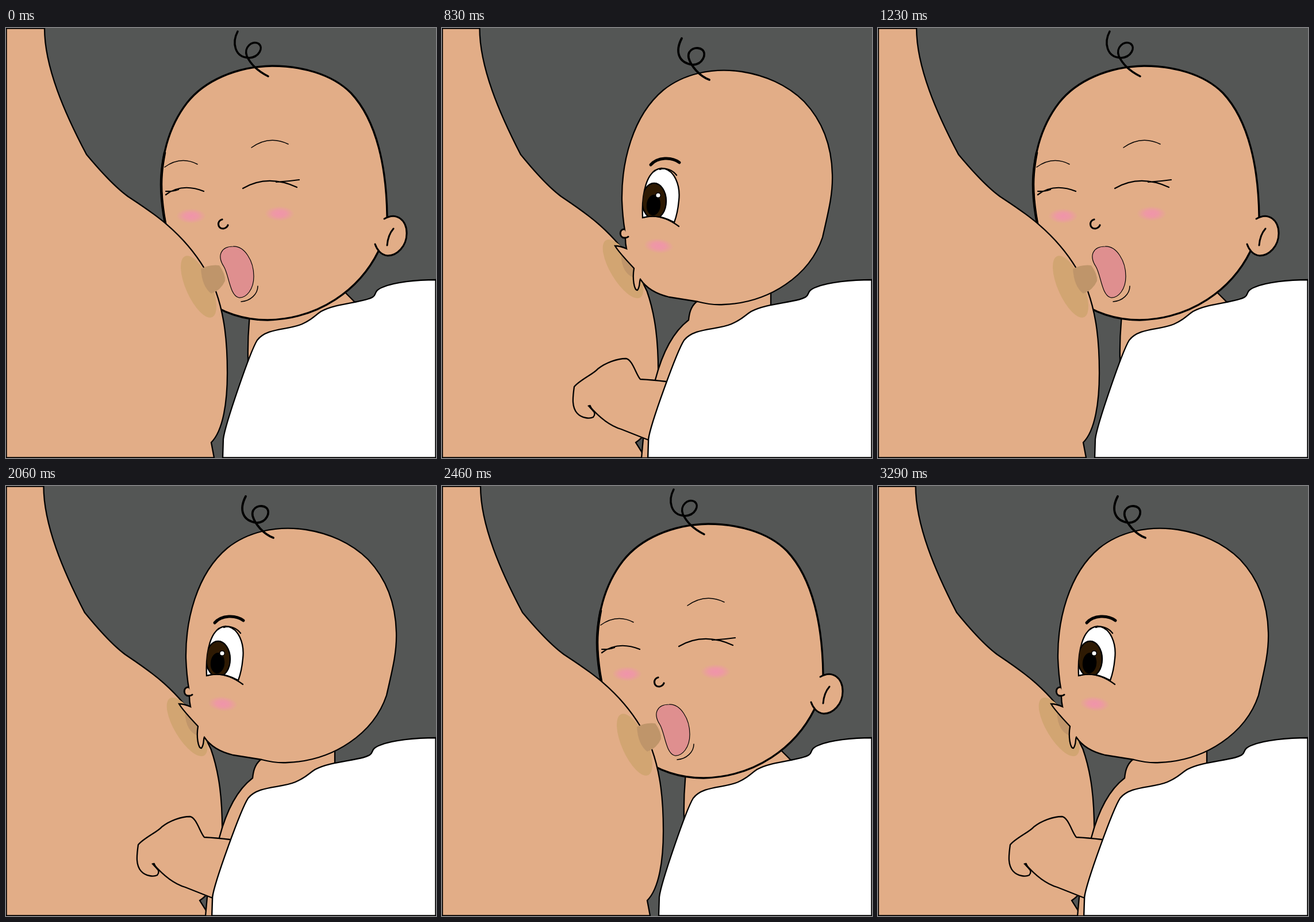
Recreate the animation shown at these times as an HTML page. Size 748 by 748 pixels, loop 3.69 s.

```html
<!DOCTYPE html>
<html lang="en">
<head>
<meta charset="utf-8">
<title>Latching on</title>
<style>
  html, body { margin: 0; width: 100%; height: 100%; overflow: hidden; background: #545655; }
  svg { display: block; width: 100%; height: 100%; }
  .skin { fill: #e2ad87; }
  .line { fill: none; }
  .thin { fill: none; stroke-width: 1.5; }
  .lid { fill: none; stroke-width: 2.2; }
  .flat { stroke: none; }
  .areola { stroke: none; fill: #d2a572; }
  .nipple { stroke: none; fill: #bf956a; }
  .mouth { fill: #df8f8f; stroke-width: 1.2; }
  .breast { vector-effect: non-scaling-stroke; }
  .blush { stroke: none; fill: url(#blush); }
  .pose { display: none; }
</style>
</head>
<body>
<svg viewBox="0 0 748 748" stroke="#000" stroke-width="2.3" stroke-linecap="round">
  <defs>
    <radialGradient id="blush">
      <stop offset="0" stop-color="#f094aa"/>
      <stop offset=".45" stop-color="#f094aa" stop-opacity=".8"/>
      <stop offset="1" stop-color="#f094aa" stop-opacity="0"/>
    </radialGradient>
    <path id="shirt" fill="#fff" d="M748 438C715 438 675 442 655 451C638 458 646 463 638 468C622 478 575 478 548 493C537 500 535 506 515 515C490 526 454 521 437 543C425 562 381 690 378 715L377 747.5H747.5V438"/>
    <path id="neck" class="skin" d="M424 500Q420 540 421 580L500 600L612 482L588 458"/>
    <path id="hair" class="line" stroke-width="3.5" d="M403 6C393 25 397 51 423 52C440 51 449 34 439 27C428 21 413 34 419 49C426 64 440 76 456 84"/>
    <g id="head">
      <path class="skin" stroke-width="3.3" d="M663 329C662 245 646 162 600 113C566 79 512 66 463 66C400 67 345 92 315 130C280 175 270 230 270 272C270 300 275 345 291 395C300 425 320 450 345 471C375 496 415 508 455 508C545 506 615 455 648 388"/>
      <path class="line" stroke-width="4.5" d="M276 217C272 237 270 255 270 272C270 300 275 345 291 395"/>
      <g stroke-width="3">
        <path class="skin" d="M658 332C680 319 697 335 697 357C697 380 680 396 664 396C652 395 645 385 642 376"/>
        <path class="line" d="M674 349C667 357 664 365 663 378"/>
      </g>
      <use href="#hair"/>
    </g>
    <path id="nipple" class="nipple" d="M339 419Q355 411 371 413Q382 428 381 440Q374 456 357 462Q341 450 339 419Z"/>
    <ellipse id="areola" class="areola" rx="22" ry="58"/>
    <path id="eye" d="M349 330C347 290 355 246 382 244C405 245 415 275 412 300Q410 322 404 338Q375 322 349 330Z"/>
    <clipPath id="eyeClip"><use href="#eye"/></clipPath>
  </defs>

  <g class="pose">
    <use href="#neck"/>
    <use href="#shirt"/>
    <use href="#head"/>
    <path class="thin" d="M276 242Q304 222 333 237M427 208Q458 186 491 202"/>
    <path class="lid" d="M278 290Q306 269 344 284M278 284Q288 285 300 281M412 279Q455 254 506 277M470 268Q490 267 510 264"/>
    <ellipse class="blush" cx="322" cy="327" rx="26" ry="13"/>
    <ellipse class="blush" cx="476" cy="323" rx="26" ry="13"/>
    <path class="line" stroke-width="3.2" d="M376 333C367 335 367 349 378 349Q384 348 386 343"/>
    <path class="breast skin" data-scale="1" data-fold="357"/>
    <use href="#areola" transform="translate(335 450) rotate(-24)"/>
    <use href="#nipple"/>
    <path class="mouth" d="M395 380C415 379 431 405 431 432C431 455 418 470 405 469C389 465 388 430 379 415C366 395 375 380 395 380Z"/>
    <path class="thin" d="M409 476C425 475 438 463 438 449"/>
  </g>

  <g class="pose">
    <use href="#neck"/>
    <use href="#shirt"/>
    <use href="#head" transform="translate(32.6 41.5) scale(.932)"/>
    <path class="thin" d="M288 268Q302 260 316 267M379 262Q412 243 444 260"/>
    <path class="lid" d="M272 311Q293 297 322 306M272 307L285 306M379 305Q410 286 451 302M415 295Q435 296 453 293"/>
    <ellipse class="blush" cx="307" cy="351" rx="13" ry="12"/>
    <ellipse class="blush" cx="412" cy="342" rx="25" ry="13"/>
    <path class="line" stroke-width="3.6" d="M329 349C320 352 321 367 333 368Q341 367 342 361"/>
    <path class="mouth" d="M304 400C318 388 342 396 350 422C356 443 351 458 345 472"/>
    <path class="mouth flat" d="M304 400L345 472L325 452L306 414Z"/>
    <path class="breast skin" data-scale=".886" data-fold="357"/>
    <use href="#areola" transform="translate(291 450) rotate(-24)"/>
    <use href="#nipple" x="-44"/>
  </g>

  <g class="pose">
    <path class="breast skin" data-scale=".977" data-fold="345"/>
    <use href="#areola" transform="translate(315 419) rotate(-31)"/>
    <path class="nipple" fill-opacity=".85" d="M312 391C310 412 320 430 333 434L336 418Z"/>
    <path class="skin" d="M443 476C432 485 430 498 429 508C400 530 382 570 371 612L350 715L347 748H450L572 600V455"/>
    <path class="skin" d="M390 615Q365 612 345 611C338 604 331 576 320 575C305 575 285 582 271 593C265 601 240 612 230 624C227 645 226 660 235 670C243 679 257 680 263 677Q268 671 263 666L256 657C268 671 288 691 312 698L360 717"/>
    <path d="M254 657L258 656L263 667Z" stroke-width="1"/>
    <use href="#shirt" transform="translate(-38.1) scale(1.051 1)"/>
    <path class="skin" d="M318 352L319 366Q319 376 321 384Q310 379 301 379C305 386 318 401 334 418C331 435 334 457 340 456C345 450 343 440 345 437C355 452 370 462 395 468L445 476C460 480 475 482 490 481C570 478 640 430 662 364C672 320 680 290 679 255C678 210 665 165 630 128C600 98 560 82 522 76C470 68 420 80 385 108C331 153 312 235 313 300C314 325 316 340 318 352"/>
    <path class="skin" stroke-width="3" d="M317 350C308 350 308 364 317 365Q322 365 324 363"/>
    <path class="line" stroke-width="3.8" d="M417 18C405 41 411 61 437 64C453 63 461 46 453 38C444 31 426 36 429 52C433 66 448 84 465 90"/>
    <path class="line" stroke-width="5" d="M363 238C375 224 400 224 413 234"/>
    <use href="#eye" fill="#fff"/>
    <g clip-path="url(#eyeClip)">
      <ellipse cx="369" cy="301" rx="21" ry="31" fill="#2e1a03"/>
      <ellipse cx="368" cy="308" rx="11" ry="17" transform="rotate(5 368 308)"/>
    </g>
    <circle cx="376" cy="291" r="4.3" fill="#fff" stroke-width="1.5"/>
    <path class="lid" d="M349 330Q380 321 412 345M379 246C390 242 402 248 408 256"/>
    <ellipse class="blush" cx="377" cy="379" rx="26" ry="13" transform="rotate(5 377 379)"/>
  </g>
</svg>
<script>
  // The breast is one outline, squeezed sideways in each pose.
  for (const breast of document.querySelectorAll('.breast')) {
    const { scale, fold } = breast.dataset;
    breast.setAttribute('transform', `scale(${scale} 1)`);
    breast.setAttribute('d', `M.5 .5H67C67 68 102 148 140 220C165 250 190 277 212 293
      C250 318 305 352 345 418L365 458C380 500 385 545 385 600C385 650 378 700 ${fold} 721
      L362 747.5H.5Z`);
  }

  const poses = document.querySelectorAll('.pose');
  const ends = [400, 830, 1230];

  function draw(now) {
    const time = now % ends[2];
    const current = ends.findIndex(end => time < end);
    poses.forEach((pose, i) => pose.style.display = i === current ? 'inline' : 'none');
    requestAnimationFrame(() => draw(performance.now()));
  }
  draw(0);
</script>
</body>
</html>
```
